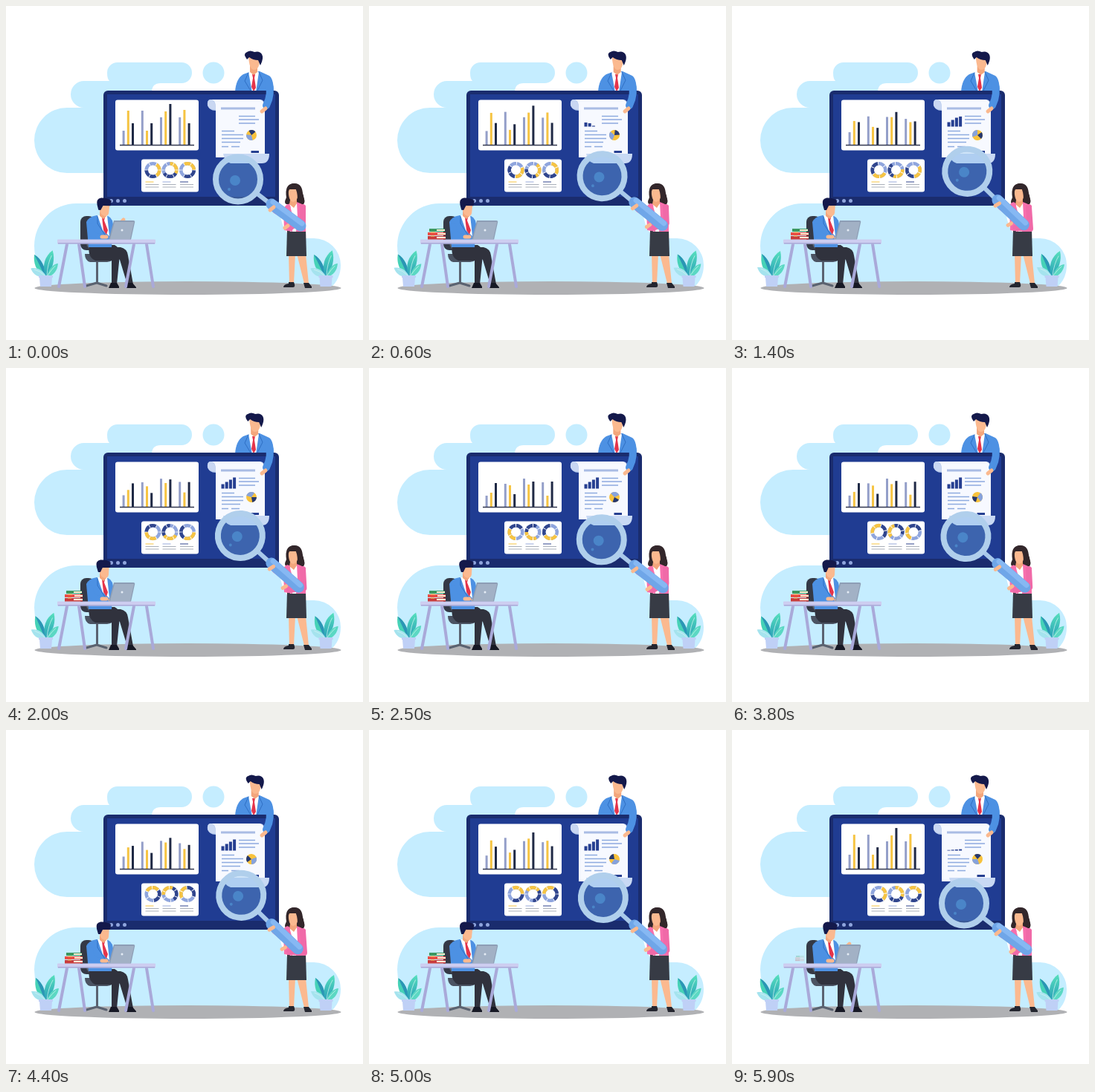
An HTML page for the animation above (6 s loop, 480 by 450 pixels).

```html
<!DOCTYPE html>
<html>
<head>
<meta charset="utf-8">
<style>
html, body { margin: 0; width: 100%; height: 100%; overflow: hidden; background: #fff; }
svg { display: block; }
.round { fill: none; stroke-linecap: round; stroke-linejoin: round; }
</style>
</head>
<body>
<svg width="480" height="450" viewBox="0 0 480 450">
  <defs>
    <linearGradient id="leaf" y1="1" x2="0" y2="0"><stop stop-color="#2a9fb8"/><stop offset="1" stop-color="#56e0bd"/></linearGradient>
    <g id="leaves">
      <path fill="#46d2b7" d="M-2 1C-14-6-16-19-14-29C-5-23-1-12 0 0Z"/>
      <path fill="#2b95b5" d="M-2 1C-6-10-10-20-14-29C-5-23-1-12 0 0Z"/>
      <path fill="url(#leaf)" d="M-1 1C-5-14 0-26 11-33C14-20 9-9 2 1Z"/>
      <path fill="#a5e3ee" d="M-2 2C-13 2-18-4-20-11C-10-12-4-7 0 1Z"/>
      <path fill="#5bd8c3" d="M1 1C4-8 9-14 17-15C16-6 10 1 2 2Z"/>
      <path class="round" stroke="#d6f7f2" stroke-width=".7" d="M1 0Q3-16 9-26M-2 0Q-8-7-15-9M2 0Q8-8 13-12"/>
    </g>
    <path id="pot" fill="#bfd0f6" d="M-10 0H9V3H8L7 15H-8L-9 3H-10Z"/>
  </defs>

  <g fill="#c5edff">
    <path d="M150 76H236A14 14 0 0 1 236 104H208Q196 104 196 116V225H82A44 44 0 0 1 82 137H105A18 18 0 0 1 105 101H139Q136 98 136 90A14 14 0 0 1 150 76Z"/>
    <circle cx="279" cy="90" r="14.5"/>
    <path d="M60 378Q38 352 38 323A57 57 0 0 1 95 266H367Q370 313 392 313H414A36 36 0 0 1 450 349Q450 368 436 380Z"/>
  </g>
  <ellipse cx="244.500" cy="380" rx="206" ry="9" fill="#b0b1b4"/>

  <!-- man behind the screen -->
  <path fill="#4d91e3" d="M308 116Q309 98 319 92L330 88L341 88L354 94Q360 98 360 118Z"/>
  <path fill="#fff" d="M326 89L333 86L340 89L336 116H331Z"/>
  <path fill="#e5354b" d="M331 92H335L334 97L336 110L333 115L330 109L332 97Z"/>
  <path class="round" stroke="#2f6fc4" d="M326 90L321 101L330 116M340 89L345 100L337 116"/>
  <g id="topHead">
    <path fill="#f3a67c" d="M329 79H339V89L334 93L329 89Z"/>
    <path fill="#fbb98f" d="M327 68H342Q343 86 334 86Q328 85 327 68Z"/>
    <path fill="#14194b" d="M325 72Q319 64 325 62Q329 59 335 62Q342 60 345 65Q348 70 343 80L340 73Q333 73 328 69Z"/>
  </g>

  <!-- screen -->
  <rect x="131" y="114" width="236" height="155" rx="6" fill="#1a2c6e"/>
  <path fill="#203c92" d="M136 119H362V257H136Z"/>
  <g fill="#8fa5dd"><circle cx="141.500" cy="262.500" r="2.500"/><circle cx="150.500" cy="262.500" r="2.500"/><circle cx="159.500" cy="262.500" r="2.500"/></g>
  <rect x="147" y="126.500" width="112" height="68" rx="3" fill="#fff"/>
  <g id="bars"></g>
  <path stroke="#333850" stroke-width="1.500" d="M153 187.500H253"/>
  <rect x="182" y="206.500" width="77" height="44" rx="3" fill="#fff"/>
  <g id="donuts"></g>

  <!-- report -->
  <path fill="#b9cdef" d="M275 126H342Q348 126 348 136V141H283Q271 141 271 131Q271 126 275 126Z"/>
  <path fill="#f7f9ff" d="M276 126H341Q348 127 348 140V204H282V136Q282 127 276 126Z"/>
  <path fill="#c9d7f2" d="M275 126Q270 127 271 134Q273 140 282 139Q282 128 275 126Z"/>
  <path stroke="#a9bce4" stroke-width="3" d="M289 138H335"/>
  <path stroke="#8eabdf" stroke-width="1.600" d="M313 148.500H335M313 153H340M313 158H335M290 168.500H307M290 173.500H319M290 178.500H319M290 183.500H315M290 189.500H299M303 189.500H314"/>
  <g id="miniBars" fill="#263f91"></g>
  <g id="pie"><circle cx="330" cy="174" r="7" fill="#f8c23c"/><path fill="#25376f" d="M330 174L326.500 168A7 7 0 0 1 335.400 169.500Z"/><path fill="#86a2dc" d="M330 174L331.700 180.800A7 7 0 0 1 323 173.300Z"/></g>
  <path stroke="#263f91" stroke-width="3" d="M329.500 196.500H340"/>
  <path fill="#c8d9f4" d="M292 199H354Q354 212 344 212H302Q294 210 292 199Z"/>
  <path class="round" stroke="#4d91e3" stroke-width="10" d="M353 102Q358 118 350 134"/>
  <path class="round" stroke="#fbb98f" stroke-width="5" d="M349 138L344 142"/>

  <!-- plants -->
  <g class="sway" data-x="54"></g><use href="#pot" x="54" y="363"/>
  <g class="sway" data-x="430"></g><use href="#pot" x="430.500" y="363"/>

  <!-- woman -->
  <path fill="#33272b" d="M377 258Q374 239 388 239Q399 239 399 255Q404 264 399 268L377 267Q373 266 377 258Z"/>
  <path fill="#fbb98f" d="M380 334H389L387 374H381ZM391 334H403L407 374H401Z"/>
  <path fill="#24262f" d="M380 372H387Q390 379 386 379H373Q373 375 380 374ZM400 373H407L411 378V380H402Z"/>
  <path fill="#373b45" d="M378 301H403L404 337H377Z"/>
  <path fill="#fff" d="M382 266H394V304H382Z"/>
  <path fill="#f76fad" d="M381 266L373 273L374 302L385 304L387 288ZM391 264L403 269L403 304H390L392 285Z"/>
  <path fill="#f3a67c" d="M383 256H391V266L387 272L381 267Z"/>
  <path fill="#fbb98f" d="M380 247H393Q394 262 386 264Q379 262 380 247Z"/>
  <path fill="#33272b" d="M379 252Q382 242 388 244Q392 249 392 261L398 267Q403 260 398 250Q397 240 387 239Q376 240 379 252Z"/>
  <path id="elbow" class="round" stroke="#f06aa8" stroke-width="8"/>

  <!-- magnifier -->
  <g id="magnifier">
    <path class="round" stroke="#f76fad" stroke-width="7" d="M379 271L370 281L362 276"/>
    <path class="round" stroke="#a9c9ea" stroke-width="6" d="M339 254L352 264"/>
    <path class="round" stroke="#6fa6e8" stroke-width="15" d="M357 267L396 296"/>
    <path class="round" stroke="#86b8f3" stroke-width="7" d="M359 264L398 293"/>
    <circle cx="312" cy="233.500" r="30" fill="#7ab8e8" fill-opacity=".32" stroke="#b0cfec" stroke-width="8"/>
    <circle cx="308" cy="235" r="7" fill="#4a85c8"/>
    <circle cx="300" cy="247" r="2" fill="#4a85c8"/>
    <path class="round" stroke="#fbb98f" stroke-width="5" d="M355 275L360 271M375 299L379 296"/>
  </g>

  <!-- man at the desk -->
  <rect x="100" y="283" width="19" height="46" rx="8" fill="#343946"/>
  <path class="round" stroke="#5a6270" stroke-width="3" d="M110 322L118 335M122.500 345V372M108 377L122 373L135 377"/>
  <path fill="#4b5362" d="M106 334H147Q145 345 136 345H113Q106 343 106 334Z"/>
  <path fill="#30323d" d="M112 322H146Q154 326 153 335L149 375H142L142 343H120Q109 338 112 322ZM140 325H154Q163 327 164 336L171 375H163L153 342Z"/>
  <path fill="#171925" d="M141 373H149L152 378V380H138ZM162 373H170L175 379V380H162Z"/>
  <path fill="#4d91e3" d="M108 291Q111 284 122 282L137 283Q145 286 144 300L142 325H111Z"/>
  <path fill="#fff" d="M123 282L136 282L139 310L130 302Z"/>
  <path fill="#e5354b" d="M129 285H133L132 289L137 302L135 308L131 302Z"/>
  <path class="round" stroke="#2f6fc4" d="M123 284L123 293L136 313M114 300Q117 312 128 310"/>
  <g id="deskHead">
    <path fill="#f3a67c" d="M126 273H135V283L131 287L126 283Z"/>
    <path fill="#fbb98f" d="M125 265H139L138 279Q136 285 130 282Q125 279 125 265Z"/>
    <path fill="#14194b" d="M122 268Q120 260 127 258.500Q136 258 141 262L140 269H130L127 275H124Z"/>
  </g>
  <path class="round" stroke="#4d91e3" stroke-width="8" d="M113 296Q114 312 127 311"/>
  <path class="round" stroke="#fbb98f" stroke-width="5" d="M129 311L135 311"/>
  <path id="wave" class="round" stroke="#fbb98f" stroke-width="5" d="M150 296L158 288"/>
  <path fill="#8d9eb5" d="M145 289H171Q174 289 173 292L168 315H138Z"/>
  <path fill="#a2b1c5" d="M146 291H172L167 314H140Z"/>
  <circle cx="156" cy="302" r="1.500" fill="#e5ecf5"/>
  <path class="round" stroke="#a9a9d9" stroke-width="4" d="M82 321L71 378M98 321L106 378M172 321L161 378M189 321L198 378"/>
  <rect x="69" y="314.500" width="132" height="6" rx="1" fill="#cdcdf0"/>
  <path fill="#aaaad8" d="M70 319H200V320.500H70Z"/>
  <g id="books">
    <path fill="#3b9860" d="M81 300H102V304H81Z"/><path fill="#e94d45" d="M79 305H103V309H79Z"/><path fill="#c93c3d" d="M79 310H103V314.500H79Z"/>
    <path stroke="#fff2da" stroke-width="2" d="M91 302H102M92 307H103M91 312H103"/>
    <path stroke="#f6bd4b" d="M83 305H89M83 310H88"/>
  </g>
</svg>
<script>
const LOOP = 6000, STEP = 100;
const $ = id => document.getElementById(id);
const set = (el, attrs) => { for (const k in attrs) el.setAttribute(k, attrs[k]); return el; };
const add = (parent, tag, attrs) =>
  parent.appendChild(set(document.createElementNS('http://www.w3.org/2000/svg', tag), attrs));
const clamp = v => Math.max(0, Math.min(1, v));
const swing = (t, period) => (1 - Math.cos(2 * Math.PI * t / period)) / 2;
const mix = (a, b, k) => a + (b - a) * k;
const transform = (el, value) => set(el, { transform: value });

const colors = ['#949fc9', '#f6c443', '#1f2945'];
const startTops = [168, 141, 158, 141, 168, 158, 150, 142, 132, 150, 140, 158];
const endTops = [172, 168, 155, 156, 158, 170, 149, 157, 153, 154, 172, 153];
const bars = startTops.map((_, i) => add($('bars'), 'rect', {
  x: 156.6 + Math.floor(i / 3) * 25.2 + i % 3 * 6.2, width: 3, fill: colors[i % 3]
}));
const miniBars = [0, 1, 2, 3].map(i => add($('miniBars'), 'rect', { x: 289.5 + i * 5.2, width: 4 }));

const donuts = [197.5, 220.5, 244].map((cx, i) => {
  const ring = add($('donuts'), 'g', {});
  const arc = (stroke, dash, offset) => add(ring, 'circle', {
    cx, cy: 221, r: 8.8, fill: 'none', stroke, 'stroke-width': 4.5,
    pathLength: 12, 'stroke-dasharray': dash, 'stroke-dashoffset': offset
  });
  arc('#8fa5dd', '12 0', 0);
  arc('#f6c443', '4 8', 2 + i);
  arc('#30458d', '4 8', i - 2);
  arc('#fff', '.2 1.8', .1);
  const line = (stroke, d) => add($('donuts'), 'path', { stroke, d: `M${cx - 10} ${d}` });
  line(['#f6c443', '#98a9d9', '#30458d'][i], '237h11');
  line('#a9afb9', '240.5h18m-18 3.500h18');
  return { ring, cx };
});

const plants = [...document.querySelectorAll('.sway')];
plants.forEach(p => add(p, 'use', { href: '#leaves', x: p.dataset.x, y: 363 }));

function draw(t) {
  const slow = clamp(1.15 * swing(t, LOOP));
  const fast = swing(t + STEP / 2, LOOP / 2);
  const turn = 360 * t / LOOP;
  bars.forEach((bar, i) => {
    const y = mix(startTops[i], endTops[i], slow);
    set(bar, { y, height: 187 - y });
  });
  miniBars.forEach((bar, i) => {
    const grow = Math.min(clamp((t - i * 270) / 650), clamp((LOOP - t) / 800));
    const height = (6 + i * 3) * grow;
    set(bar, { y: 162.5 - height, height });
  });
  donuts.forEach(d => transform(d.ring, `rotate(${turn} ${d.cx} 221)`));
  transform($('pie'), `rotate(${turn} 330 174)`);
  transform($('magnifier'), `rotate(${6.8 * fast} 404 264)`);
  set($('elbow'), { d: `M399 271L${mix(399, 401, fast)} ${mix(288, 300, fast)}L381 299` });
  plants.forEach(p => transform(p, `rotate(${4 * (fast - 1)} ${p.dataset.x} 363)`));
  transform($('topHead'), `translate(${mix(-1, .7, fast)} 0)`);
  transform($('deskHead'), `rotate(${mix(2, -1, slow)} 130 283)`);
  const drop = Math.min(slow, .5);
  transform($('wave'), `translate(${-20 * drop} ${34 * drop})`);
  const pop = clamp(Math.min(t, LOOP - t) / 400);
  set($('books'), { opacity: pop, transform: `translate(91 308) scale(${Math.sqrt(pop)}) translate(-91 -308)` });
}

const start = performance.now();
function frame() {
  draw(Math.floor((performance.now() - start) % LOOP / STEP) * STEP);
  requestAnimationFrame(frame);
}
frame();
</script>
</body>
</html>
```
